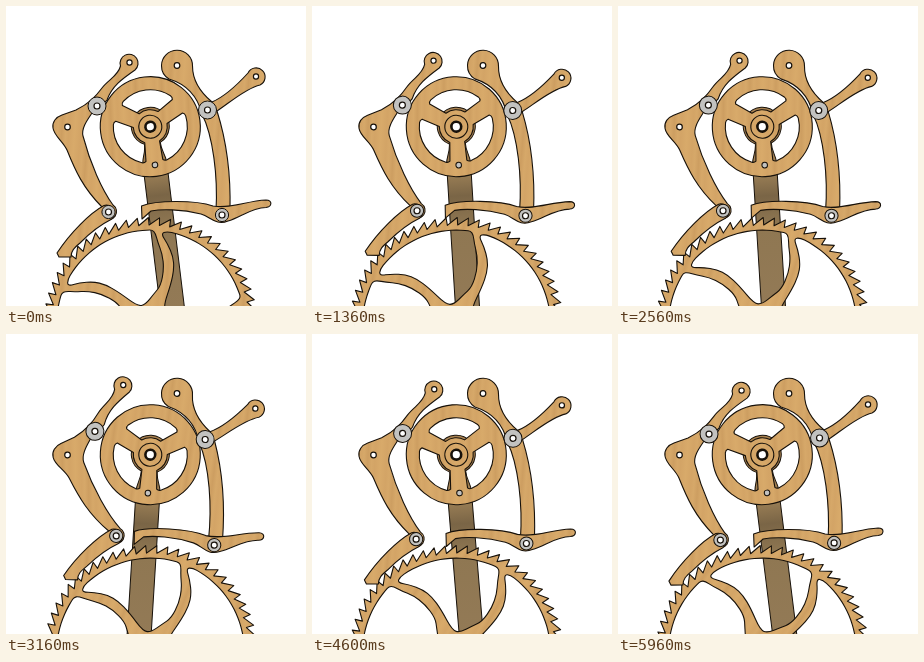
Recreate the animation shown at these times as an HTML page. Size 300x300 px, loop 6 s.

```html
<!DOCTYPE html>
<html lang="en">
<head>
<meta charset="utf-8">
<title>Grasshopper escapement</title>
<style>
  html, body { margin: 0; width: 100%; height: 100%; overflow: hidden; background: #fff; }
  svg { display: block; width: 100vw; height: 100vh; }
  .wood { fill: url(#wood); stroke: #17110a; stroke-width: 1.1; stroke-linejoin: round; }
  .rod { fill: url(#rod); stroke: #17110a; stroke-width: 1; }
  .steel { fill: #c2c2c0; stroke: #17110a; stroke-width: 1; }
  .hole { fill: #fff; stroke: #17110a; stroke-width: 1.2; }
</style>
</head>
<body>
<svg viewBox="0 0 300 300">
  <defs>
    <linearGradient id="wood" gradientUnits="userSpaceOnUse" x1="0" y1="0" x2="13" y2="1" spreadMethod="reflect">
      <stop offset="0" stop-color="#d8aa6a"/>
      <stop offset=".45" stop-color="#d3a466"/>
      <stop offset=".7" stop-color="#d6a869"/>
      <stop offset="1" stop-color="#cd9e61"/>
    </linearGradient>
    <linearGradient id="rod" gradientUnits="userSpaceOnUse" x1="0" y1="15" x2="0" y2="185">
      <stop offset="0" stop-color="#a98250"/>
      <stop offset=".2" stop-color="#977c54"/>
      <stop offset=".32" stop-color="#7a6546"/>
      <stop offset=".5" stop-color="#8f7752"/>
      <stop offset="1" stop-color="#937a56"/>
    </linearGradient>
  </defs>

  <g id="pendulum">
    <path class="rod" d="M-8 17 A19 19 0 1 1 8 17 C8 27 12 29 12 38 V210 H-12 V38 C-12 29 -8 27 -8 17Z"/>
  </g>

  <g id="wheel"><path id="wheelShape" class="wood" fill-rule="evenodd"/></g>

  <g id="ring">
    <path id="ringShape" class="wood" fill-rule="evenodd"/>
    <circle class="wood" r="11.5"/>
    <circle r="6.2" fill="#17110a"/>
    <circle r="3.6" fill="#fff"/>
    <circle class="steel" cy="38.5" r="2.8"/>
  </g>

  <g id="leftArm">
    <path class="wood" d="M114.5 60 C112 70 103 73 96 82 C90 90 84 97 70 104 L56 109 C50 111 46 116 47 122 C48 130 57 135 61 144 C69 164 77 182 96 201 A8 8 0 1 0 107 199 C96 184 84 157 77 130 C75 122 82 113 86 107 C92 99 98 98 101 94 C106 80 116 73 129 64 A9 9 0 1 0 114.5 60Z"/>
    <circle class="hole" cx="123.5" cy="56.5" r="2.6"/>
    <circle class="hole" cx="61.5" cy="121" r="2.8"/>
    <circle class="steel" cx="91" cy="100" r="9"/>
    <circle class="hole" cx="91" cy="100" r="3"/>
    <g id="leftPallet">
      <path class="wood" d="M98 199.5 C84 207 64 227 51 247 L53 251 L65 251 C65 245 68 242 74 237 C83 228 92 220 105 213.6 A8 8 0 0 0 98 199.5Z"/>
      <circle class="steel" cx="102.5" cy="206" r="6.6"/>
      <circle class="hole" cx="102.5" cy="206" r="3"/>
    </g>
  </g>

  <g id="rightArm">
    <path class="wood" d="M155.5 59.5 A15.5 15.5 0 0 1 186.5 60 C186.5 73 194 86 206 96 C220 90 232 78 242 67 A9 9 0 1 1 254 79 C240 82 222 98 211 105 C219 130 225 165 224 205 A8 8 0 0 1 210 205 C212 170 207 130 196 108 C192 92 183 79 163 73 A15.5 15.5 0 0 1 155.5 59.5Z"/>
    <circle class="hole" cx="171" cy="59.5" r="2.8"/>
    <circle class="hole" cx="250" cy="70.5" r="2.6"/>
    <circle class="steel" cx="201.5" cy="104" r="9"/>
    <circle class="hole" cx="201.5" cy="104" r="3"/>
    <g id="rightPallet">
      <path class="wood" d="M135.5 200 C150 194 190 194 207 200 C225 203 240 195 260 194 C267 194 266 201 260 201.5 C245 202 235 211 222 215 C210 220 205 211 195 208 C175 203 155 203 145 205 L136 213Z"/>
      <circle class="steel" cx="216" cy="209" r="6.6"/>
      <circle class="hole" cx="216" cy="209" r="3"/>
    </g>
  </g>
</svg>
<script>
const LOOP = 6000, STEP = 40, PERIOD = 1200;
const TEETH = 60, PITCH = 360 / TEETH, SPOKES = 5, RIM = 94;
const SWING = 7.1, REST = Math.cos(Math.PI / 15);
const DRIVE = 3.2, CATCH = PITCH / (4 * DRIVE);
const $ = id => document.getElementById(id);

// Angles run clockwise from the top.
function polar(r, deg) {
  const a = deg * Math.PI / 180;
  return [r * Math.sin(a), -r * Math.cos(a)];
}
const xy = p => p.map(v => v.toFixed(2)).join(' ');
const mid = (p, q) => [(p[0] + q[0]) / 2, (p[1] + q[1]) / 2];
const circle = r => `M0 ${-r}A${r} ${r} 0 1 1 0 ${r}A${r} ${r} 0 1 1 0 ${-r}Z`;

function smooth(points) {
  let d = 'M' + xy(mid(points[points.length - 1], points[0]));
  points.forEach((p, i) => {
    d += 'Q' + xy(p) + ' ' + xy(mid(p, points[(i + 1) % points.length]));
  });
  return d + 'Z';
}

function wheelPath() {
  const teeth = [];
  for (let i = 0; i < TEETH; i++) {
    const a = i * PITCH + 4.8;
    teeth.push(xy(polar(106.5, a)), xy(polar(99, a + 0.3)));
  }
  let d = 'M' + teeth.join('L') + 'Z';
  const edge = [[45, -45], [60, -49], [71, -53.5], [82, -60], [91, -65.5], [RIM, -62]];
  for (let a = -56; a <= -2; a += 6) edge.push([RIM, a]);
  edge.push([RIM, 1], [91, 3], [82, 5], [71, 9.5], [57, 13.5], [40, 15], [30, 6], [20, -15], [22, -36]);
  for (let k = 0; k < SPOKES; k++) {
    d += smooth(edge.map(([r, a]) => polar(r, a + k * 360 / SPOKES)));
  }
  return d;
}

function ringPath() {
  let d = circle(50);
  for (let k = 0; k < 3; k++) {
    const at = (r, a) => xy(polar(r, a + k * 120));
    d += `M${at(35, -46)}Q${at(37, -44)} ${at(37, -40)}A37 37 0 0 1 ${at(37, 40)}` +
         `Q${at(37, 44)} ${at(35, 46)}L${at(17, 34)}A17 17 0 0 0 ${at(17, -34)}Z`;
  }
  return d;
}

$('wheelShape').setAttribute('d', wheelPath());
$('ringShape').setAttribute('d', ringPath());

function place(id, x, y, deg) {
  $(id).setAttribute('transform', `translate(${x} ${y}) rotate(${deg})`);
}
function turn(id, deg, x, y) {
  $(id).setAttribute('transform', `rotate(${deg} ${x} ${y})`);
}

// The pallets drive the wheel in turn, each with a short recoil.
function wheelAngle(cycles, s) {
  const n = Math.floor(cycles), rising = cycles - n >= 0.5;
  if (!rising && s > -CATCH) return n * PITCH + DRIVE * (1 - s);
  if (rising && s > CATCH) return (n + 1) * PITCH + DRIVE * (1 - s);
  return (n + 0.5) * PITCH + DRIVE * (1 + s);
}

function draw(ms) {
  const t = Math.floor(ms % LOOP / STEP) * STEP;
  const cycles = (t + STEP) / PERIOD;
  const s = Math.cos(2 * Math.PI * cycles), d = REST - s;
  place('pendulum', 144.3, 120.5, -SWING * s);
  place('ring', 144.3, 120.7, -SWING * s);
  place('wheel', 144.5, 318, wheelAngle(cycles, s));
  turn('leftArm', -3.6 * d, 61.5, 121);
  turn('leftPallet', 4.6 * d, 102.5, 206);
  turn('rightArm', 2 * d, 171, 59.5);
  turn('rightPallet', 0.3 * d, 216, 209);
}

const start = performance.now();
function tick() {
  draw(performance.now() - start);
  requestAnimationFrame(tick);
}
tick();
</script>
</body>
</html>
```
